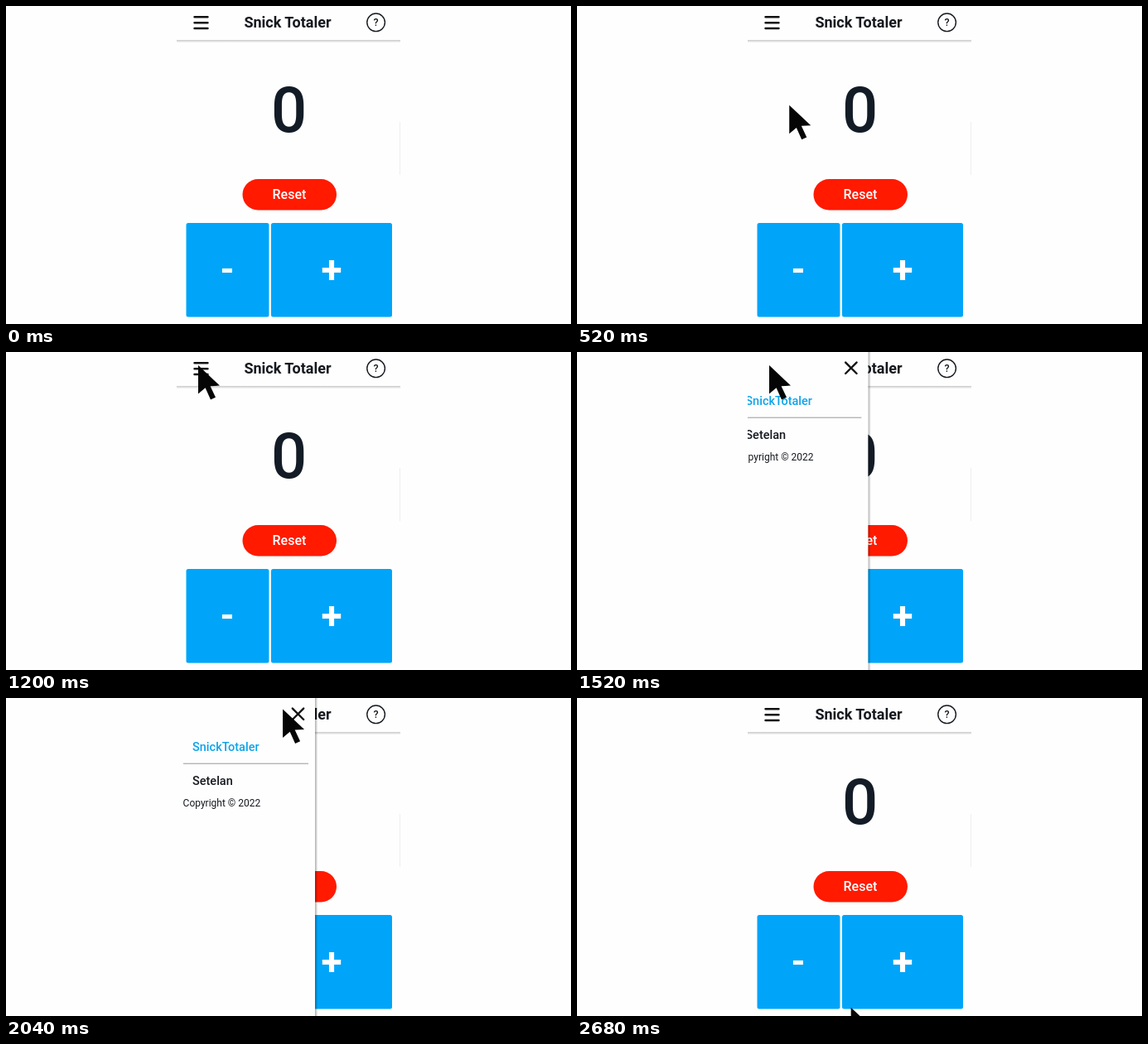
Write an HTML page that moves like this. It is 682 px wide and 384 px high and loops after 2.72 s.

```html
<!DOCTYPE html>
<html lang="en">
<head>
<meta charset="utf-8">
<title>Snick Totaler</title>
<style>
  html, body { margin: 0; width: 100%; height: 100%; overflow: hidden; background: #fefefe; }
  svg { display: block; width: 682px; height: 384px; font-family: Roboto, sans-serif; }
  text { fill: #16191f; font-weight: 500; }
  .mid { text-anchor: middle; }
  .line { fill: none; stroke: #111; stroke-width: 2.4; stroke-linecap: round; }
  .light { fill: #fff; }
</style>
</head>
<body>
<svg viewBox="0 0 682 384">
  <defs>
    <clipPath id="phone"><rect x="206" width="270" height="384"/></clipPath>
    <linearGradient id="below" x2="0" y2="1">
      <stop stop-color="#c8c8c8"/><stop offset="1" stop-color="#fefefe"/>
    </linearGradient>
    <linearGradient id="beside">
      <stop stop-color="#000" stop-opacity=".32"/><stop offset="1" stop-color="#000" stop-opacity="0"/>
    </linearGradient>
  </defs>

  <g clip-path="url(#phone)">
    <rect x="206" y="41" width="270" height="3.5" fill="url(#below)"/>
    <path d="M475.5 140V204" stroke="#eee"/>
    <path class="line" d="M227.5 13.3H243.5M227.5 20.2H243.5M227.5 27H243.5"/>
    <text class="mid" x="340" y="25.6" font-size="18" style="font-weight:700">Snick Totaler</text>
    <circle cx="446.6" cy="19.8" r="10.8" fill="none" stroke="#16191f" stroke-width="1.4"/>
    <text class="mid" x="446.6" y="24.2" font-size="12.5">?</text>

    <text class="mid" x="341.5" y="152" font-size="76" style="fill:#131c26">0</text>
    <rect x="285.5" y="209" width="113.5" height="37.5" rx="18.75" fill="#ff1a00"/>
    <text class="mid light" x="342" y="233" font-size="16">Reset</text>

    <rect x="217.5" y="262" width="100" height="113.5" rx="2.5" fill="#00a5f9"/>
    <rect x="320" y="262" width="146" height="113.5" rx="2.5" fill="#00a5f9"/>
    <text class="mid light" x="267" y="333" font-size="44" style="font-weight:700">-</text>
    <text class="mid light" x="393" y="333.5" font-size="46" style="font-weight:700">+</text>

    <g id="drawer">
      <rect x="373" width="3.5" height="384" fill="url(#beside)"/>
      <rect x="200" width="173" height="384" fill="#fefefe"/>
      <path class="line" d="M345.8 12.6L359.2 26M359.2 12.6L345.8 26"/>
      <text x="225" y="64" font-size="14.5" style="fill:#0da4ea">SnickTotaler</text>
      <path d="M214 79.2H365" stroke="#999"/>
      <text x="225" y="104.6" font-size="14.5">Setelan</text>
      <text x="213.6" y="131.2" font-size="12" style="font-weight:400">Copyright © 2022</text>
    </g>
  </g>
  <path id="cursor" d="M0 0V34.5L8.6 27.3L15 41.5L21 38.8L14.6 25.2L26 24.6Z" fill="#050505"/>
</svg>
<script>
  const LOOP = 2720, TICK = 40, WIDTH = 168;
  const drawer = document.getElementById('drawer');
  const cursor = document.getElementById('cursor');

  const easeOut = u => 1 - (1 - u) ** 1.95;
  const easeIn = u => u ** 1.5;

  // start, end, from, to, easing
  const moves = [
    [20, 1060, [319, 388], [232, 16], easeOut],
    [1740, 2200, [232, 16], [349, 13], easeOut],
    [2270, 2690, [349, 13], [330, 387], easeIn],
  ];

  const span = (t, a, b) => Math.min(1, Math.max(0, (t - a) / (b - a)));

  // cubic-bezier(.25, .1, .25, 1)
  function ease(x) {
    let lo = 0, hi = 1;
    for (let i = 0; i < 20; i++) {
      const s = (lo + hi) / 2;
      const bx = .75 * s * (1 - s) + s ** 3;
      if (bx < x) lo = s; else hi = s;
    }
    return .3 * lo * (1 - lo) ** 2 + 3 * lo * lo * (1 - lo) + lo ** 3;
  }

  function draw(t) {
    const [a, b, from, to, curve] = moves.filter(m => t >= m[0]).pop() || moves[0];
    const u = curve(span(t, a, b));
    const [x, y] = from.map((v, i) => v + (to[i] - v) * u);
    cursor.setAttribute('transform', `translate(${x} ${y})`);

    const open = ease(span(t, 1230, 1730)) - ease(span(t, 2190, 2690));
    drawer.setAttribute('transform', `translate(${(open - 1) * WIDTH} 0)`);
    drawer.setAttribute('visibility', open > .004 ? 'visible' : 'hidden');
  }

  const start = performance.now();
  function loop() {
    const t = (performance.now() - start) % LOOP;
    draw(Math.floor(t / TICK) * TICK);
    requestAnimationFrame(loop);
  }
  draw(0);
  requestAnimationFrame(loop);
</script>
</body>
</html>
```
